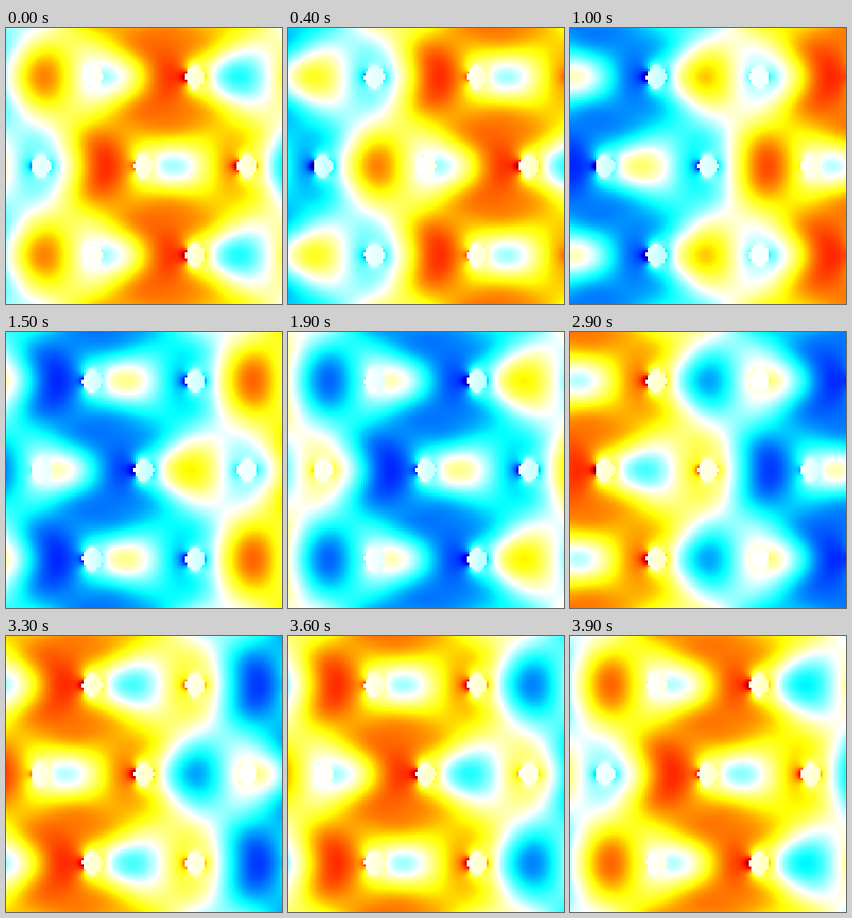
Write an HTML page with a canvas that moves like this. It is 400 by 400 pixels and loops after 4000 ms.

```html
<!DOCTYPE html>
<html>
<head>
<meta charset="utf-8">
<title>Bloch wave in a rod lattice</title>
<style>
  html, body { margin: 0; width: 100%; height: 100%; overflow: hidden; background: #fff; }
  canvas { display: block; width: 400px; height: 400px; image-rendering: pixelated; }
</style>
</head>
<body>
<canvas id="view" width="128" height="128"></canvas>
<script>
const { sin, cos, PI, round, hypot, atan2, abs } = Math;
const N = 128, CELL = 400 / N;
const A = 149.3, ROW = A * Math.sqrt(3) / 2;   // triangular lattice
const X0 = 199.8, Y0 = 200, RADIUS = 14.6;
const G = 2 * PI / A, H = PI / ROW;            // reciprocal lattice
const K = G / 5;                               // a fifth of a turn per rod
const PHASE = K * A / 2 - 53 * PI / 180;
const LOOP = 4000, STEP = 100;

// Offset from the nearest rod of the row
function fromRod(x, y) {
  const m = round(y / ROW), dx = x - m * A / 2;
  return [dx - A * round(dx / A), y - m * ROW];
}

// Complex amplitude with the period of the lattice: [real, imaginary]
function envelope(x, y) {
  const [dx, dy] = fromRod(x, y), r = hypot(dx, dy);
  if (r < RADIUS) {
    const a = 0.18 + 0.008 * dx;
    return [0.85 * a, -0.53 * a];
  }
  // plane waves
  const gx = G * x, hy = H * y;
  const re = 1.15 - 0.42 * cos(2 * hy) - 0.05 * cos(4 * hy)
    - sin(gx) * (0.85 * cos(hy) + 0.2 * cos(3 * hy));
  const im = 0.25 + 0.12 * cos(2 * hy) - 1.1 * cos(gx) * cos(hy);
  // dipole and quadrupole around the rod
  const near = (RADIUS / r) ** 3, angle = atan2(dy, dx);
  const dipole = near * cos(2 * angle), quad = near * cos(3 * angle);
  return [re + 0.9 * dipole - 0.4 * quad, im - 0.7 * dipole];
}

const cosPart = new Float32Array(N * N), sinPart = new Float32Array(N * N);
for (let j = 0; j < N; j++) {
  for (let i = 0; i < N; i++) {
    const x = (i + 0.5) * CELL - X0, y = (j + 0.5) * CELL - Y0;
    const [re, im] = envelope(x, y);
    const c = cos(K * x + PHASE), s = sin(K * x + PHASE);
    cosPart[j * N + i] = re * c - im * s;
    sinPart[j * N + i] = re * s + im * c;
  }
}

const ctx = document.getElementById("view").getContext("2d");
const image = ctx.createImageData(N, N), px = image.data;

// White through yellow and red to black, or through cyan and blue when negative
function draw(time) {
  const w = 2 * PI * time / LOOP, c = cos(w), s = sin(w);
  for (let i = 0, o = 0; i < N * N; i++, o += 4) {
    const v = cosPart[i] * c + sinPart[i] * s, m = abs(v);
    const last = 255 * (3 - m), first = 255 * (1 - m);
    px[o] = v > 0 ? last : first;
    px[o + 1] = 255 * (2 - m);
    px[o + 2] = v > 0 ? first : last;
    px[o + 3] = 255;
  }
  ctx.putImageData(image, 0, 0);
}

let start = null, shown = -1;
function tick(now) {
  if (start === null) start = now;
  const step = Math.floor(((now - start) % LOOP) / STEP);
  if (step !== shown) draw((shown = step) * STEP);
  requestAnimationFrame(tick);
}
draw(0);
requestAnimationFrame(tick);
</script>
</body>
</html>
```
